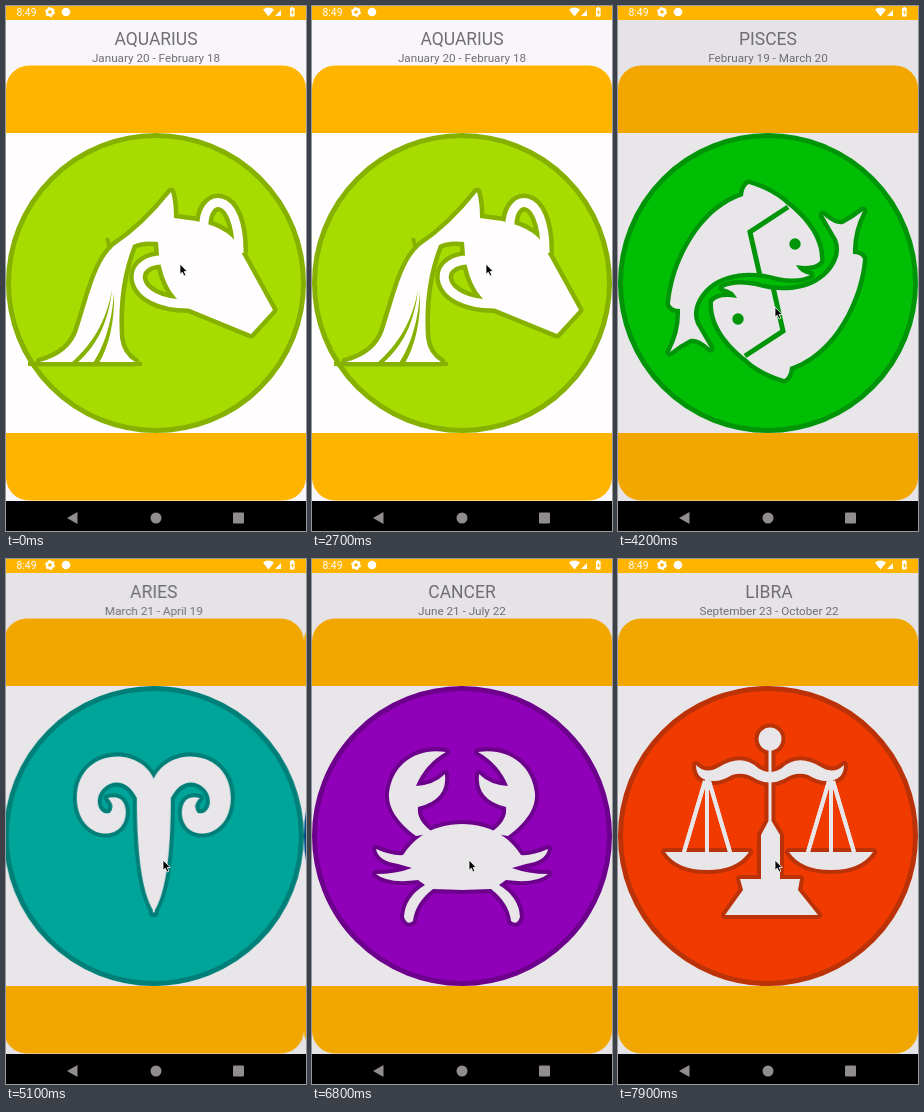
These frames come from a looping animation (300 px wide and 525 px high, 8000 ms). An HTML page without scripts:

```html
<!DOCTYPE html>
<html lang="en">
<head>
<meta charset="utf-8">
<title>Zodiac pager</title>
<style>
html, body { margin: 0; width: 100%; height: 100%; overflow: hidden; background: #000; }
svg { display: block; width: 300px; height: 525px; }
text { font-family: Roboto, "Liberation Sans", sans-serif; text-anchor: middle; fill: #706e71; }
.name { font-size: 17.5px; }
.date { font-size: 11.7px; }

/* --c page colour, --d its darker edge; currentColor is the white of the pictures */
.disc { fill: var(--c); stroke: var(--d); stroke-width: 5; }
.s { fill: currentColor; stroke: var(--d); stroke-width: 9; paint-order: stroke; stroke-linejoin: round; }
.sharp { stroke-linejoin: miter; stroke-miterlimit: 8; }
.o { fill: var(--d); stroke: var(--d); stroke-width: 8; stroke-linejoin: round; }
.w { fill: currentColor; }
.d { fill: var(--d); }
.c { fill: var(--c); }
.ld { fill: none; stroke: var(--d); }
.lw { fill: none; stroke: currentColor; }
.rope { fill: none; stroke-width: 4; stroke: currentColor; }

#back { animation: back 8s step-end infinite; }
#tone { animation: tone 8s step-end infinite; }
#strip { animation: swipe 8s cubic-bezier(.2, .6, .35, 1) infinite; }
#mouse { animation: mouse 8s ease-in-out infinite; }
@keyframes back { 0% { fill: #f8f6fa } 44%, 100% { fill: #e5e3e6 } }
@keyframes tone {
  0% { fill: #ffb400; color: #fffdfe }
  44%, 100% { fill: #f2a700; color: #e8e6e9 }
}
@keyframes mouse {
  0%, 35% { transform: translate(174px, 258px) }
  41%, 100% { transform: translate(157px, 301px) }
}
@keyframes swipe {
  0%, 46.25% { transform: translateX(0) }
  51.25%, 56.9% { transform: translateX(-300px) }
  61.9%, 63.75% { transform: translateX(-600px) }
  68.75%, 73.1% { transform: translateX(-900px) }
  73.75%, 74.9% { transform: translateX(-915px) }
  78.1%, 80% { transform: translateX(-1200px) }
  84.4%, 85.6% { transform: translateX(-1500px) }
  88.75%, 90% { transform: translateX(-1800px) }
  92.5%, 93.6% { transform: translateX(-2055px) }
  93.75%, 95% { transform: translateX(-2100px) }
  98.1%, 100% { transform: translateX(-2400px) }
}
</style>
</head>
<body>
<svg viewBox="0 0 300 525">
<defs>
  <g id="card">
    <rect y="59.500" width="300" height="435" rx="23"/>
    <rect class="w" y="127" width="300" height="300"/>
    <circle class="disc" cx="150" cy="277" r="147.500"/>
  </g>
  <path id="loops" d="M198 224C195 186 234 182 233 247M166 255C119 246 117 300 186 298"/>
  <g id="fish">
    <path class="s" d="M131 178C145 182 160 190 168 198C190 215 203 235 202 255Q196 262 178 259Q182 267 192 269Q180 275 160 271C130 262 95 266 80 293Q73 306 78 318L92 342Q80 331 72 333Q62 338 52 346Q63 325 62 303Q54 303 52 298C55 260 80 205 125 190Q126 180 131 178Z"/>
    <path class="ld" stroke-width="5" d="M170 201L132 226L142 270"/>
    <circle class="d" cx="177" cy="238" r="5.700"/>
  </g>
  <g id="halfcrab">
    <path d="M151 265C128 265 106 273 91 296Q80 297 64 290Q66 302 86 305L100 309Q84 315 64 315Q76 325 106 321L113 326Q93 338 92 358Q95 367 101 362Q103 344 121 330L151 331Z"/>
    <path d="M104 277C84 262 76 248 77 234C80 205 105 188 134 193Q113 205 104 227Q122 226 133 215Q136 241 106 248Q104 262 122 274Z"/>
  </g>
  <g id="crab">
    <use href="#halfcrab"/>
    <use href="#halfcrab" transform="matrix(-1 0 0 1 300 0)"/>
  </g>
  <g id="pan">
    <path d="M-42 293H42Q30 311 0 311Q-30 311 -42 293Z"/>
    <path class="rope" d="M0 214V293M-2 222L-23 293M2 222L23 293"/>
  </g>
  <g id="scales">
    <circle cx="152" cy="180" r="11.500"/>
    <path d="M150.500 190h3V262L162 276V320H182L180 331L200 356H107L125 331L122 320H143V276L150.500 262Z"/>
    <path d="M78 206Q88 216 101 208Q124 194 140 209Q152 217 164 209Q180 194 203 208Q216 216 226 206Q226 222 208 222Q200 222 190 216Q178 212 166 220Q152 227 138 220Q126 212 114 216Q104 222 96 222Q78 222 78 206Z"/>
    <use href="#pan" x="89"/>
    <use href="#pan" x="213"/>
  </g>
  <g id="twin">
    <circle cx="118" cy="207" r="19"/>
    <path d="M94 238Q118 222 142 238L150 286L139 290L135 354H121L118 304L114 354H100L97 290L84 284Z"/>
  </g>
  <path id="horn" d="M151 222C136 184 72 190 73 240C74 282 122 285 122 253Q121 235 104 239Q112 247 106 254C92 257 88 233 106 225Q122 219 133 239Q133 330 151 354Z"/>
</defs>

<rect id="back" width="300" height="525"/>
<g id="tone"><g id="strip">

  <g style="--c:#a6dc00;--d:#86b100">
    <use href="#card"/>
    <text class="name" x="150" y="39">AQUARIUS</text>
    <text class="date" x="150" y="56">January 20 - February 18</text>
    <use class="ld" stroke-width="18" href="#loops"/>
    <path class="s" d="M165 186Q168 196 168 212L190 215Q228 223 235 246L267 304L245 328L184 303Q154 287 152 236Q136 234 127 239C115 270 112 300 114 332Q116 348 129 356H34Q64 348 72 324C83 290 90 256 108 240Q138 220 165 186Z"/>
    <use class="lw" stroke-width="9" href="#loops"/>
    <path class="d" d="M106 283C101 315 85 340 65 357H71C91 340 103 315 106 283ZM108 286C106 320 96 344 87 357H93C103 340 109 315 108 286Z"/>
    <path class="ld" stroke-width="4" d="M101 232L104 243M22 358H136"/>
  </g>

  <g transform="translate(300)" style="--c:#00be04;--d:#009508">
    <use href="#card"/>
    <text class="name" x="150" y="39">PISCES</text>
    <text class="date" x="150" y="56">February 19 - March 20</text>
    <use href="#fish"/>
    <use href="#fish" transform="rotate(180 148.500 275.500)"/>
  </g>

  <g transform="translate(600)" style="--c:#00a59a;--d:#007f78">
    <use href="#card"/>
    <text class="name" x="150" y="39">ARIES</text>
    <text class="date" x="150" y="56">March 21 - April 19</text>
    <g class="o"><use href="#horn"/><use href="#horn" transform="matrix(-1 0 0 1 300 0)"/></g>
    <g class="w"><use href="#horn"/><use href="#horn" transform="matrix(-1 0 0 1 300 0)"/></g>
  </g>

  <g transform="translate(900)" style="--c:#005fb8;--d:#004d8e">
    <use href="#card"/>
    <text class="name" x="150" y="39">TAURUS</text>
    <text class="date" x="150" y="56">April 20 - May 20</text>
    <g transform="translate(151)">
      <path class="ld" stroke-width="13" d="M-17 361A18 21 0 0 0 19 361"/>
      <path class="s sharp" d="M0 228L44 229Q58 228 60 212Q61 195 54 179C75 195 84 220 82 236Q78 252 38 254Q40 260 49 284Q47 296 29 305C24 320 29 335 32 355Q28 364 12 362Q0 364 -12 362Q-28 364 -32 355C-29 335 -24 320 -29 305Q-47 296 -49 284Q-40 260 -38 254Q-78 252 -82 236C-84 220 -75 195 -54 179Q-61 195 -60 212Q-58 228 -44 229Z"/>
      <path class="lw" stroke-width="6" d="M-17 361A18 21 0 0 0 19 361"/>
    </g>
  </g>

  <g transform="translate(1200)" style="--c:#3a00a2;--d:#2b007a">
    <use href="#card"/>
    <text class="name" x="150" y="39">GEMINI</text>
    <text class="date" x="150" y="56">May 21 - June 20</text>
    <g class="o"><use href="#twin"/><use href="#twin" x="66"/></g>
    <g class="w"><use href="#twin"/><use href="#twin" x="66"/></g>
  </g>

  <g transform="translate(1500)" style="--c:#9000b8;--d:#6c008c">
    <use href="#card"/>
    <text class="name" x="150" y="39">CANCER</text>
    <text class="date" x="150" y="56">June 21 - July 22</text>
    <use class="o" href="#crab"/>
    <use class="w" href="#crab"/>
  </g>

  <g transform="translate(1800)" style="--c:#ca008a;--d:#98006a">
    <use href="#card"/>
    <text class="name" x="150" y="39">LEO</text>
    <text class="date" x="150" y="56">July 23 - August 22</text>
    <path class="s" d="M150 178L176 190L204 194L212 222L228 248L216 276L216 304L194 322L178 346L150 360L122 346L106 322L84 304L84 276L72 248L88 222L96 194L124 190Z"/>
    <path class="ld" stroke-width="5" d="M112 232Q150 204 188 232Q196 280 170 318Q150 334 130 318Q104 280 112 232M138 290H162L150 302V314M124 256H138M162 256H176"/>
  </g>

  <g transform="translate(2100)" style="--c:#e80010;--d:#b81a10">
    <use href="#card"/>
    <text class="name" x="150" y="39">VIRGO</text>
    <text class="date" x="150" y="56">August 23 – September 22</text>
    <g transform="translate(-45)">
      <path class="s" style="stroke-width:6" d="M167 199C166 180 182 166 208 168C260 164 282 205 279 255C275 310 250 345 215 356Q165 360 131 386Q126 378 130 366L125 350Q132 334 180 317Q205 309 217 290L218 280L208 288Q190 303 158 299Q152 295 152 288Q147 287 147 284L149 279L145 276L148 271Q141 270 143 264Q150 250 150 236Q153 215 167 199Z"/>
      <g class="d">
        <path d="M175 198Q187 242 220 278Q213 302 185 308Q168 307 155 301Q195 302 210 288Q181 248 167 200Z"/>
        <path d="M229 295Q215 315 180 325Q135 330 126 352Q145 337 185 336Q222 325 229 295Z"/>
        <path d="M236 320Q215 340 180 344Q140 350 128 372Q150 356 185 355Q225 350 236 320Z"/>
        <path d="M196 162Q225 168 230 188Q215 176 196 170Z"/>
        <path d="M232 180Q256 195 248 215Q248 195 232 180Z"/>
        <path d="M261 205Q275 245 249 269Q263 240 261 205Z"/>
        <path d="M151 238Q157 231 165 237Q158 240 151 238Z"/>
      </g>
      <g class="c">
        <path d="M174 206Q187 245 216 279Q210 297 185 305Q172 305 164 303Q199 300 213 287Q184 248 174 206Z"/>
        <path d="M225 304Q211 320 180 328Q144 332 133 343Q150 333 185 333Q215 325 225 304Z"/>
        <path d="M231 328Q212 343 180 347Q148 351 136 363Q155 352 185 352Q217 347 231 328Z"/>
      </g>
    </g>
  </g>

  <g transform="translate(2400)" style="--c:#f03a00;--d:#bb3208">
    <use href="#card"/>
    <text class="name" x="151" y="39">LIBRA</text>
    <text class="date" x="151" y="56">September 23 - October 22</text>
    <use class="o" href="#scales"/>
    <use class="w" href="#scales"/>
  </g>
</g></g>

<rect width="300" height="14" fill="#ffb400"/>
<g fill="#fff">
  <text x="20.500" y="10" style="font-size:10.300px;fill:#fff">8:49</text>
  <circle cx="44" cy="6" r="3" fill="none" stroke="#fff" stroke-width="2.400"/>
  <circle cx="44" cy="6" r="4.400" fill="none" stroke="#fff" stroke-width="1.200" stroke-dasharray="2.300"/>
  <circle cx="60" cy="6" r="4.300"/>
  <path d="M257 3.500Q262.500 -.5 268 3.500L262.500 10.500ZM275 4V10H269Z"/>
  <path d="M284 2h1.300V1h2V2h1.300V10.500H284Z"/>
</g>
<path d="M286.800 3.500L285 6.700h1.200v2.500L288 6h-1.200Z" fill="#ffb400"/>

<path d="M0 495H300V525H0Z"/>
<g fill="#918c8e">
  <path d="M61 512L71.500 506V518Z"/>
  <circle cx="150" cy="512" r="5.500"/>
  <rect x="227" y="506.500" width="11" height="11" rx="1"/>
</g>

<path id="mouse" d="M0 0V10.200L2.300 8.200L4 12L5.800 11.200L4.200 7.500H7.200Z" fill="#000" stroke="#fff" stroke-width=".8"/>
</svg>
</body>
</html>
```
